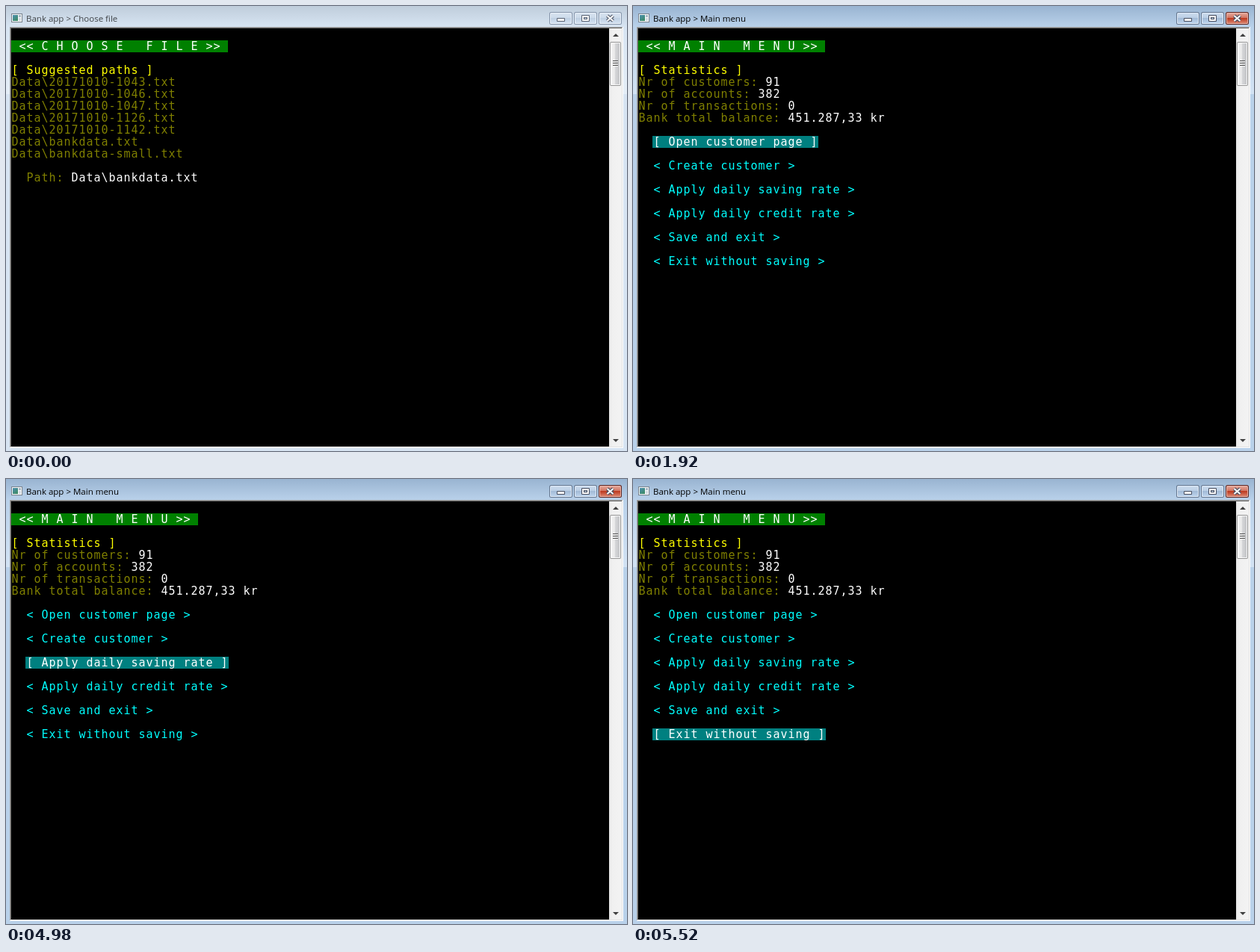
These frames come from a looping animation (831 by 596 pixels, 8 s). An HTML page with a canvas:

```html
<!DOCTYPE html>
<html lang="en">
<head>
<meta charset="utf-8">
<title>Console menu</title>
<style>
html, body { margin: 0; width: 831px; height: 596px; overflow: hidden; }
canvas { display: block; }
</style>
</head>
<body>
<canvas id="stage" width="831" height="596"></canvas>
<script>
const ctx = document.getElementById('stage').getContext('2d');
const LOOP = 8000;
const LEFT = 7, TOP = 30, CELL = 10, ROW = 16;
const OLIVE = '#808000', YELLOW = '#ffff00', GREEN = '#008000',
      TEAL = '#008080', CYAN = '#00ffff', WHITE = '#ffffff';

const PATHS = ['20171010-1043', '20171010-1046', '20171010-1047', '20171010-1126',
               '20171010-1142', 'bankdata', 'bankdata-small'];
const STATS = [['Nr of customers:', '91'], ['Nr of accounts:', '382'],
               ['Nr of transactions:', '0'], ['Bank total balance:', '451.287,33 kr']];
const MENU = ['Open customer page', 'Create customer', 'Apply daily saving rate',
              'Apply daily credit rate', 'Save and exit', 'Exit without saving'];
const SELECT_TIMES = [1920, 4320, 4980, 5160, 5340, 5520];

function box(x, y, w, h, fill) {
  ctx.fillStyle = fill;
  ctx.fillRect(x, y, w, h);
}

function shade(x0, y0, x1, y1, ...stops) {
  const g = ctx.createLinearGradient(x0, y0, x1, y1);
  stops.forEach(([at, color]) => g.addColorStop(at, color));
  return g;
}

function rounded(x, y, w, h, r, fill) {
  ctx.beginPath();
  ctx.roundRect(x, y, w, h, r);
  ctx.fillStyle = fill;
  ctx.fill();
}

function polygon(fill, ...points) {
  ctx.beginPath();
  points.forEach(([x, y]) => ctx.lineTo(x, y));
  ctx.fillStyle = fill;
  ctx.fill();
}

// Console text: one glyph per cell.
function print(col, row, text, color) {
  ctx.font = '15px "DejaVu Sans Mono", monospace';
  ctx.textAlign = 'center';
  ctx.fillStyle = color;
  [...text].forEach((ch, i) => {
    ctx.fillText(ch, LEFT + (col + i) * CELL + CELL / 2, TOP + row * ROW + 13);
  });
}

function heading(text) {
  box(LEFT, TOP + ROW, text.length * CELL, ROW, GREEN);
  print(0, 1, text, WHITE);
}

function cursor(col, row) {
  box(LEFT + col * CELL, TOP + row * ROW + 12, CELL, 4, WHITE);
}

function captionButton(x, red, active) {
  const [edge, rim, a, b, c, d] = red
    ? ['#5b2420', '#eab5a9', '#e3a597', '#d0705c', '#bd3a20', '#d8806a']
    : active
      ? ['#62758f', '#dfe9f5', '#cbdbed', '#b9cde4', '#a3bbd7', '#bcd2eb']
      : ['#8494aa', '#e9f0f8', '#d6e2ef', '#ccdaea', '#bfd0e3', '#d2e0f0'];
  rounded(x, 8, 31, 17, 2.5, edge);
  rounded(x + 1, 9, 29, 15, 1.5, rim);
  box(x + 2, 10, 27, 13, shade(0, 10, 0, 23, [0, a], [0.48, b], [0.5, c], [1, d]));
}

function cross(x, y, width, color) {
  ctx.lineWidth = width;
  ctx.strokeStyle = color;
  ctx.beginPath();
  ctx.moveTo(x - 4, y - 3.5);
  ctx.lineTo(x + 4, y + 3.5);
  ctx.moveTo(x + 4, y - 3.5);
  ctx.lineTo(x - 4, y + 3.5);
  ctx.stroke();
}

function captionButtons(active) {
  const ink = active ? '#474e60' : '#596273';
  captionButton(727, false, active);
  rounded(737, 16, 11, 5, 1, ink);
  box(738, 17, 9, 3, '#fafafa');

  captionButton(760, false, active);
  rounded(770, 12, 11, 9, 1, ink);
  box(771, 13, 9, 7, '#fafafa');
  box(773, 15, 5, 3, ink);
  box(774, 16, 3, 1, '#c5d6e9');

  captionButton(793, active, active);
  cross(808.5, 16.5, 4.4, ink);
  cross(808.5, 16.5, 2.2, '#fafafa');
}

function windowIcon() {
  box(7, 10, 15, 12, '#79838d');
  box(8, 11, 13, 10, '#f8fafb');
  box(9, 12, 7, 8, shade(9, 12, 15, 20, [0, '#4d8fb0'], [1, '#3d8b62']));
  box(17, 12, 3, 3, '#a9b8c6');
  box(17, 16, 3, 4, '#d3dae1');
}

function scrollbar() {
  box(807, 30, 17, 560, shade(807, 0, 824, 0, [0, '#e6e6e6'], [0.25, '#f0f0f0'], [1, '#f3f3f3']));
  polygon('#404040', [812, 41], [816, 37], [820, 41]);
  polygon('#404040', [812, 580], [816, 584], [820, 580]);

  rounded(808, 48, 15, 59, 2, '#959595');
  rounded(809, 49, 13, 57, 1, '#fafafa');
  box(810, 50, 11, 55, shade(810, 0, 821, 0, [0, '#f3f3f3'], [0.48, '#e6e6e7'], [0.5, '#d5d6d8'], [1, '#c4c5c8']));
  for (let y = 73; y < 81; y += 3) {
    box(812, y, 7, 1, '#4c4c4c');
    box(812, y + 1, 7, 1, '#f8f8f8');
  }
}

function windowFrame(title, active) {
  const [top, body, glow] = active
    ? ['#99b4d1', '#b9d1ea', '#d3e3f4']
    : ['#bfcddb', '#d7e4f2', '#e5eef7'];
  box(0, 0, 831, 596, body);
  for (const x of [0, 826]) {
    box(x, 28, 5, 90, shade(0, 28, 0, 118, [0, body], [1, glow]));
  }
  box(0, 0, 831, 28, shade(0, 0, 0, 28, [0, top], [1, body]));

  windowIcon();
  ctx.font = '11.5px "Open Sans", sans-serif';
  ctx.textAlign = 'left';
  ctx.fillStyle = active ? '#000000' : '#3f4347';
  ctx.fillText(title, 27, 21);
  captionButtons(active);

  // Sunken client edge.
  box(5, 28, 821, 564, '#ffffff');
  box(5, 28, 820, 563, '#a0a0a0');
  box(6, 29, 819, 562, '#e3e3e3');
  box(6, 29, 818, 1, '#696969');
  box(6, 29, 1, 561, '#696969');
  box(LEFT, TOP, 800, 560, '#000000');
  scrollbar();
}

function chooseFile(t) {
  windowFrame('Bank app > Choose file', t >= 540);
  heading(' << C H O O S E   F I L E >> ');
  print(0, 3, '[ Suggested paths ]', YELLOW);
  PATHS.forEach((name, i) => print(0, 4 + i, `Data\\${name}.txt`, OLIVE));
  print(2, 12, 'Path:', OLIVE);
  print(8, 12, 'Data\\bankdata.txt', WHITE);
  if (t >= 1080 && t < 1560) cursor(25, 12);
  if (t >= 1560 && t < 1620) cursor(0, 13);
}

function mainMenu(t) {
  windowFrame('Bank app > Main menu', true);
  heading(' << M A I N   M E N U >> ');
  print(0, 3, '[ Statistics ]', YELLOW);
  STATS.forEach(([label, value], i) => {
    print(0, 4 + i, label, OLIVE);
    print(label.length + 1, 4 + i, value, WHITE);
  });

  const selected = SELECT_TIMES.findLastIndex(start => t >= start);
  const redrawing = t >= 4920 && t < 4980;
  MENU.slice(0, redrawing ? 2 : MENU.length).forEach((label, i) => {
    const row = 9 + i * 2;
    if (i === selected) {
      box(LEFT + 19, TOP + row * ROW, (label.length + 4) * CELL + 2, ROW, TEAL);
      print(2, row, `[ ${label} ]`, WHITE);
    } else {
      print(2, row, `< ${label} >`, CYAN);
    }
  });
}

function draw(now) {
  const t = now % LOOP;
  if (t < 1920) chooseFile(t);
  else mainMenu(t);
}

const start = performance.now();
function tick() {
  draw(performance.now() - start);
  requestAnimationFrame(tick);
}
tick();
</script>
</body>
</html>
```
